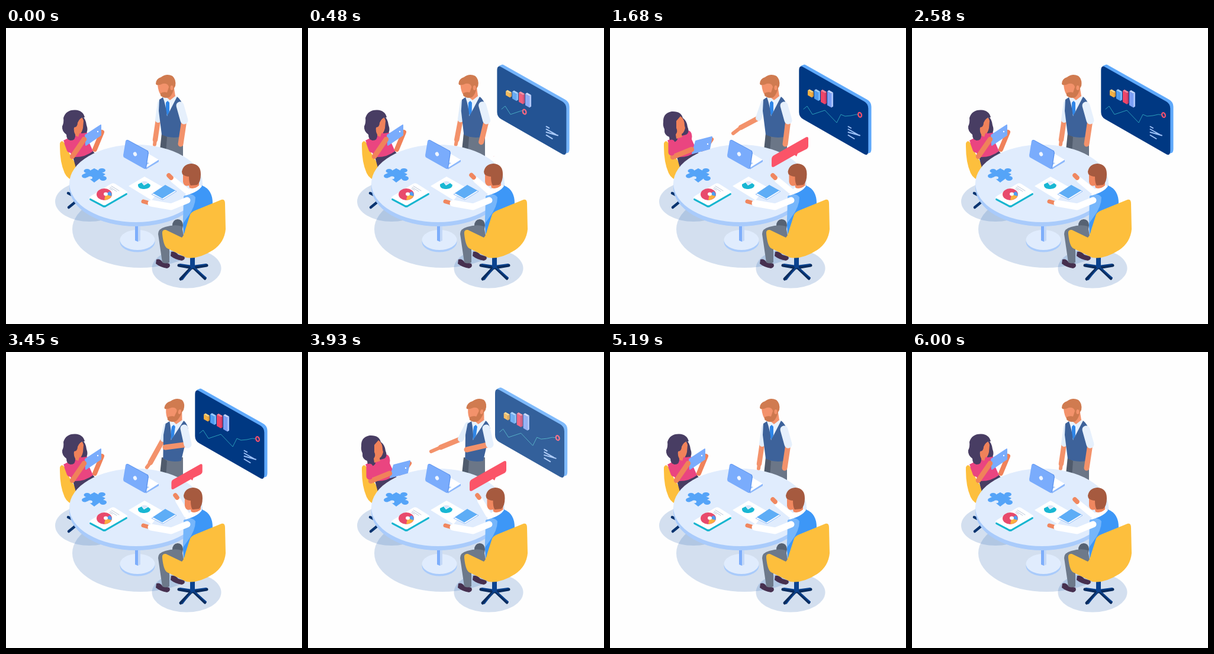
Write an HTML page that moves like this. It is 500 px wide and 500 px high and loops after 6.36 s.

```html
<!DOCTYPE html>
<html lang="en">
<head>
<meta charset="utf-8">
<title>Team meeting</title>
<style>
html, body { margin: 0; width: 100%; height: 100%; overflow: hidden; background: #fefefe; }
svg { display: block; width: 100vw; height: 100vh; }
.limb { fill: none; stroke-linecap: round; stroke-linejoin: round; }
.skin { fill: #f3926b; }
.gold { fill: #fdbf3d; }
.shade { fill: rgba(40, 100, 180, .2); }
</style>
</head>
<body>
<svg viewBox="0 0 500 500">
  <defs>
    <path id="panel" d="M319 72Q319 62 326 66L429 124Q436 128 436 136V207Q436 217 429 213L326 154Q319 150 319 142Z"/>
    <path id="board" d="M143 284L176 264Q180 261 184 263L203 275Q207 277 203 279L170 298Q166 301 162 298L143 288Q139 286 143 284Z"/>
  </defs>

  <ellipse class="shade" cx="227" cy="340" rx="115" ry="65"/>
  <ellipse class="shade" cx="141" cy="293" rx="58" ry="34"/>
  <ellipse class="shade" cx="305" cy="406" rx="58.5" ry="33.5"/>

  <g id="screen">
    <g fill="#5fa9fb"><use href="#panel" x="5.500" y="-3"/><use href="#panel" x="2.700" y="-2"/></g>
    <use href="#panel" x=".3" fill="#003882"/>
    <g id="bars"></g>
    <path id="trend" class="limb" stroke="#2b9bb8" d="M327 137L333 132L342 146L363 139L383 160L390 146L397 149L407 148L416 146L425 147"/>
    <ellipse id="dot" rx="2.7" ry="4" fill="#003882" stroke="#f2506e" stroke-width="2.3"/>
    <path class="limb" stroke="#9dc2f8" stroke-width="2" d="M402.5 166.5l4.5 2.5M402.5 171l16 9M402.5 176l19.5 5.500M402.5 181l10 6"/>
  </g>

  <!-- left chair -->
  <path class="gold" d="M91 195Q94 187 100 196Q105 210 118 230V259Q104 256 99 245Q91 227 91 200Z"/>
  <path class="limb" stroke="#0a3470" stroke-width="4.5" d="M105 279l10 5M106 303l11-9"/>

  <!-- woman -->
  <path fill="#483d63" d="M112 214Q130 218 146 207L152 214L118 236Z"/>
  <path id="wFar" class="limb" stroke="#f0825a" stroke-width="8"/>
  <path fill="#ea4580" d="M97 190Q106 185 118 180L133 173Q140 176 138 188L147 208Q133 219 114 218Q104 206 97 190Z"/>
  <g id="lookHead">
    <path fill="#483d63" d="M129 149Q135 154 136 164Q139 172 136 177L127 178Z"/>
    <path fill="#f0825a" d="M115 160L122 151Q129 148 131 157L130 169Q128 178 124 178L122 184L114 180Z"/>
    <path fill="#483d63" d="M97 152Q101 138 117 138.500Q130 139 133 151Q125 150 121 160Q121 167 115 168Q114 175 117 180Q118 190 109 190Q102 189 102 180Q94 174 95 166Q98 160 97 152Z"/>
  </g>
  <g id="restHead">
    <path fill="#483d63" d="M90 159Q89 144 104 141Q120 140 123 152Q130 157 131 167Q135 176 129 180L114 184Q115 192 107 193Q100 192 100 184Q91 181 92 171Q89 165 90 159Z"/>
    <path fill="#f0825a" d="M112 157L119 149Q126 154 126 165L127 169Q125 177 121 179L122 184L112 187L111 180Q115 175 112 169Z"/>
  </g>

  <!-- standing man -->
  <path fill="#6b7687" d="M263 178H299L299 225H262Z"/>
  <path fill="#505b6c" d="M263 178L272 184L269 225H258Z"/>
  <path id="mFore" class="limb" stroke="#f3926b" stroke-width="8.5"/>
  <path id="mTip" class="limb" stroke="#f3926b" stroke-width="6"/>
  <path id="mSleeve" class="limb" stroke="#e2eefb" stroke-width="10"/>
  <g id="torso">
    <path fill="#e9f2fd" d="M262 121L268 115L286 113L291 122L272 152Z"/>
    <path fill="#2f86e8" d="M270 126L273 123L276 126L276 141L273 149L270 142Z"/>
    <path fill="#3d629a" d="M259 121L265 117Q270 130 272 149L289 116Q297 122 299 133L294 184Q276 187 263 180L258 140Z"/>
    <path class="skin" d="M270 106L284 102L286 115L277 122L271 117Z"/>
    <path class="skin" d="M256 92L275 90L276 112Q266 118 260 111Q256 103 256 92Z"/>
    <path fill="#cd784e" d="M261 110Q267 107 272 109L276 97L284 100Q282 112 276 117Q267 120 261 114Z"/>
    <path fill="#d07b50" d="M253 94Q253 86 262 83Q271 76 281 81Q288 87 286 98L282 105L277 104L274 97Q271 93 265 94Q259 97 254 96Z"/>
    <ellipse class="skin" cx="280" cy="101" rx="2.5" ry="4"/>
  </g>
  <path id="mNear" class="limb" stroke="#f3926b" stroke-width="9"/>
  <path id="mUpper" class="limb" stroke="#e6f0fc" stroke-width="13"/>

  <!-- table -->
  <ellipse cx="222" cy="361.5" rx="29.5" ry="17" fill="#a9cbfb"/>
  <ellipse cx="222" cy="358" rx="29.5" ry="17" fill="#e0ecfd"/>
  <path fill="#7eaefb" d="M218 330H223V361L218 359Z"/>
  <path fill="#c3d8f7" d="M223 330H227V359L223 361Z"/>
  <path fill="#a9cbfb" d="M107 262V269A112.500 66 0 0 0 332 269V262Z"/>
  <ellipse cx="219.5" cy="262.5" rx="112.5" ry="65.5" fill="#e0ecfd"/>

  <!-- puzzle piece -->
  <g fill="#55a4f8">
    <path d="M131 247L149 237L168 247L149 261Z"/>
    <ellipse cx="137" cy="241.5" rx="5.5" ry="3.5"/><ellipse cx="162" cy="240.5" rx="6" ry="3.5"/>
    <ellipse cx="164" cy="254" rx="6" ry="4"/><ellipse cx="133" cy="250" rx="5" ry="3.5"/>
  </g>
  <ellipse cx="142" cy="253" rx="4" ry="2.5" fill="#e0ecfd"/>

  <!-- clipboard -->
  <use href="#board" y="3.5" fill="#16b5cf"/>
  <use href="#board" fill="#fff"/>
  <ellipse cx="166" cy="281" rx="13" ry="10" fill="#e84a6c"/>
  <path fill="#fbb040" d="M168 281L179 281Q178 289 166 291Z"/>
  <path fill="#4f9df2" d="M168 281L175 276Q180 279 178 284Z"/>
  <ellipse cx="168.5" cy="280.5" rx="3.5" ry="3" fill="#fff"/>
  <path class="limb" stroke="#b9c5d8" d="M178 267l13 8M176 269l11 7M175 271l5 3"/>

  <!-- papers -->
  <path fill="#fff" d="M207 267L234 251L264 268L246 291Z"/>
  <path fill="#19b7d3" d="M223 264Q222 272 234 272Q244 271 244 265L240 262L233 266L229 261Z"/>
  <path fill="#d9e6fa" d="M229 260Q235 257 240 261L233 265Z"/>
  <path fill="#fff" stroke="#7fb0f5" stroke-width=".8" d="M246 281L269 266L288 276L265 290Z"/>
  <path fill="#5eadf6" d="M248 279L269 265L286 274.500L264 288Z"/>

  <!-- laptop -->
  <path fill="#8db8fb" d="M240 213L258 223V226L236 239Z"/>
  <path fill="#fff" d="M240 212L258 222.500L236 236.500Z"/>
  <path fill="#a9cbfb" d="M238 227l4 1-4 3Z"/>
  <path fill="#5c93ee" d="M203 189L206 189L240 207.500L241 211L237 237L234 238Z"/>
  <path fill="#7aacfc" d="M202 191Q203 188 206 190L237 207Q240 209 239.500 212L236 236Q235 239 232 237L200 219Q198 218 198 215Z"/>
  <ellipse cx="218" cy="213" rx="3" ry="3.7" fill="#eef5ff" transform="rotate(-25 218 213)"/>

  <!-- woman's tablet and front arm -->
  <path id="tablet" fill="#7aacfc" stroke="#7aacfc" stroke-width="2" stroke-linejoin="round"/>
  <circle id="mark" r="1.2" fill="#fff"/>
  <path id="wNear" class="limb" stroke="#f0825a" stroke-width="8.5"/>
  <path id="wSleeve" class="limb" stroke="#ea4580" stroke-width="11"/>

  <path id="bubble" fill="#fb5468" d="M273 222Q273 217 277 215L331 184.500Q335 183 335 187V199Q335 203 331 205L317 212L315 217L312 214.500L277 234.500Q273 236 273 232Z"/>

  <!-- seated man -->
  <path fill="#46304f" d="M279 378Q286 377 291 383L301 386Q304 391 297 393Q285 391 278 385Z"/>
  <path fill="#566273" d="M281 334Q281 324 290 323Q298 323 299 333L297 345Z"/>
  <path id="sFore" class="limb" stroke="#fff" stroke-width="10"/>
  <path id="sHand" class="limb" stroke="#f0875f" stroke-width="7.5"/>
  <path fill="#3d97f7" d="M302 283Q322 278 331 266Q349 273 349 296L340 320L300 348Q297 320 303 300Z"/>
  <path fill="#76b6fb" d="M300 284Q314 277 320 286Q320 302 307 319L299 330Z"/>
  <path fill="#fff" d="M303 281Q309 268 324 264L331 267Q325 277 303 283Z"/>
  <path class="limb" stroke="#f0875f" stroke-width="7" d="M232 293L239 295"/>
  <path class="limb" stroke="#fff" stroke-width="11" d="M245 296L279 302L306 291"/>
  <g id="sHead">
    <path fill="#f0875f" d="M299 244L308 246L326 256V266Q318 273 310 270L309 266Q301 269 299 260Z"/>
    <path fill="#a65a3f" d="M297 243Q299 230 313 229Q329 230 329 247Q329 260 323 265L312 266Q309 262 309 251Q303 251 298 247Z"/>
  </g>
  <path fill="#46304f" d="M254 391Q260 389 264 395L276 398Q279 404 272 406Q260 404 253 398Z"/>
  <path fill="#6d798a" d="M257 348Q257 339 269 336Q285 331 297 335L301 355L276 353L276 396Q270 399 264 396Z"/>

  <!-- right chair -->
  <path class="limb" stroke="#0a2c5e" stroke-width="5" stroke-linecap="butt" d="M315 405L292 401M315 405L339 401M315 403L295 424M315 403L336 423"/>
  <path class="limb" stroke="#0b4390" stroke-width="2" d="M315 402L294 399M315 402L338 399M315 403L298 425M316 403L338 422"/>
  <path fill="#0b4390" d="M311 384H319V404L315 406L311 404Z"/>
  <path class="gold" d="M364 290Q370 288 370 297L371 340Q369 362 350 375Q325 391 305 388L272 372Q266 368 264 348Q263 340 270 341L297 354Q300 352 303 340L311 315Q313 311 320 308Z"/>
</svg>
<script>
const $ = id => document.getElementById(id);
const set = (id, name, value) => $(id).setAttribute(name, value);
const clamp = x => Math.max(0, Math.min(1, x));
const part = (t, from, to) => clamp((t - from) / (to - from));
const smooth = p => p * p * (3 - 2 * p);
const out = p => 1 - (1 - p) ** 3;
const mix = (a, b, p) => a.map((v, i) => v + (b[i] - v) * p);
const line = (id, ...xy) => set(id, 'd', 'M' + xy.join(' '));
const move = (id, x, y) => set(id, 'transform', `translate(${x} ${y})`);
// rises over a..b and falls over c..d
const hold = (t, a, b, c, d) => smooth(part(t, a, b)) - smooth(part(t, c, d));

// lean, far shoulder, elbow, wrist, fingertip, near shoulder, elbow, hand
const stand = [0, 261,127, 257,155, 252,189, 251,197, 294,131, 301,156, 295,196];
const point = [.14, 271,125, 266,147, 244,187, 238,195, 301,129, 307,156, 269,161];
const offer = [.14, 270,123, 258,147, 224,161, 208,168, 301,129, 307,156, 268,165];
const reach = [0, 260,126, 251,152, 221,168, 208,178, 294,131, 301,156, 296,196];
const poses = [[0, stand], [420, stand], [740, point], [960, offer], [1230, offer],
  [1500, reach], [2000, reach], [2400, stand], [9999, stand]];

// front elbow, front hand, far elbow, far hand, tablet corners
const look = [112,217, 132,188, 150,205, 162,176, 134,181, 160,164, 160,181, 135,198];
const rest = [106,218, 138,205, 158,207, 171,188, 145,191, 172,184, 168,204, 139,212];

function pose(u) {
  const i = poses.findIndex(k => k[0] > u);
  const [a, from] = poses[i - 1], [b, to] = poses[i];
  return mix(from, to, smooth(part(u, a, b)));
}

function bar(x, base, h, [front, side, top]) {
  const y = base - h;
  return `<path fill="${front}" d="M${x} ${y}l7 4v${h}l-7-4Z"/>
    <path fill="${side}" d="M${x + 7} ${y + 4}l3-2v${h}l-3 2Z"/>
    <path fill="${top}" d="M${x} ${y}l3-2 7 4-3 2Z"/>`;
}

const bars = [
  [8, ['#f5b042', '#d99a3c', '#ffd27a']],
  [14, ['#4f9df2', '#79b8fb', '#9accff']],
  [19, ['#ef4568', '#c93a66', '#ff8196']],
  [23.5, ['#7c9ff5', '#a9c2ff', '#c3d5ff']]
];

function drawScreen(t) {
  const come = part(t, 120, 540), go = part(t, 3800, 4440);
  const away = 26 * (1 - out(come));
  set('screen', 'opacity', come * (1 - go));
  move('screen', away - 80 * go * go, -away * .56 - 45.5 * go * go);
  const grow = out(part(t, 150, 900));
  $('bars').innerHTML = bars.map(([h, c], i) => bar(334 + 11 * i, 113.5 + 5.7 * i, h * grow, c)).join('');
  const trend = $('trend'), all = trend.getTotalLength();
  const done = all * out(part(t, 150, 2290)), end = trend.getPointAtLength(done);
  set('trend', 'stroke-dasharray', `${done} ${all + 9}`);
  set('dot', 'transform', `translate(${end.x} ${end.y}) rotate(-20)`);
}

function drawStanding(u) {
  const p = pose(u), k = p[0], at = i => p.slice(2 * i + 1, 2 * i + 3);
  set('torso', 'transform', `matrix(1 0 ${-k} 1 ${197 * k} 0)`);
  line('mSleeve', ...at(0), ...at(1));
  line('mFore', ...at(1), ...at(2));
  line('mTip', ...at(2), ...at(3));
  line('mUpper', ...at(4), ...at(5));
  line('mNear', ...at(5), ...at(6));
}

function drawWoman(u) {
  const w = hold(u, 760, 1010, 1950, 2350), p = mix(look, rest, w);
  // the head turns halfway through the move
  set('lookHead', 'visibility', w < .5 ? 'visible' : 'hidden');
  set('restHead', 'visibility', w < .5 ? 'hidden' : 'visible');
  move('lookHead', -5.5 * w, 2 * w);
  move('restHead', 5.5 * (1 - w), -2 * (1 - w));
  line('wSleeve', 104, 194, ...mix([108, 205], [104, 210], w));
  line('wNear', ...p.slice(0, 4));
  line('wFar', ...p.slice(4, 8));
  set('tablet', 'd', 'M' + p.slice(8).join(' ') + 'Z');
  const [x, y] = mix([155, 175], [165, 196], w);
  set('mark', 'cx', x);
  set('mark', 'cy', y);
}

function drawSeated(u) {
  const talk = hold(u, 450, 850, 2000, 2350), lift = hold(u, 420, 740, 1230, 1500);
  set('bubble', 'transform', `translate(314 217) scale(${talk}) translate(-314 -217)`);
  move('sHead', 3.5 * talk, 0);
  line('sFore', 305, 275, ...mix([283, 257], [291, 251], lift));
  line('sHand', ...mix([279, 253], [289, 246], lift), ...mix([275, 249], [286, 242], lift));
}

function frame(now) {
  const t = Math.min(Math.floor(now % 6360 / 30) * 30, 6000);
  const u = t < 2700 ? t : t - 2700;
  drawScreen(t);
  drawStanding(u);
  drawWoman(u);
  drawSeated(u);
  requestAnimationFrame(frame);
}
frame(0);
</script>
</body>
</html>
```
